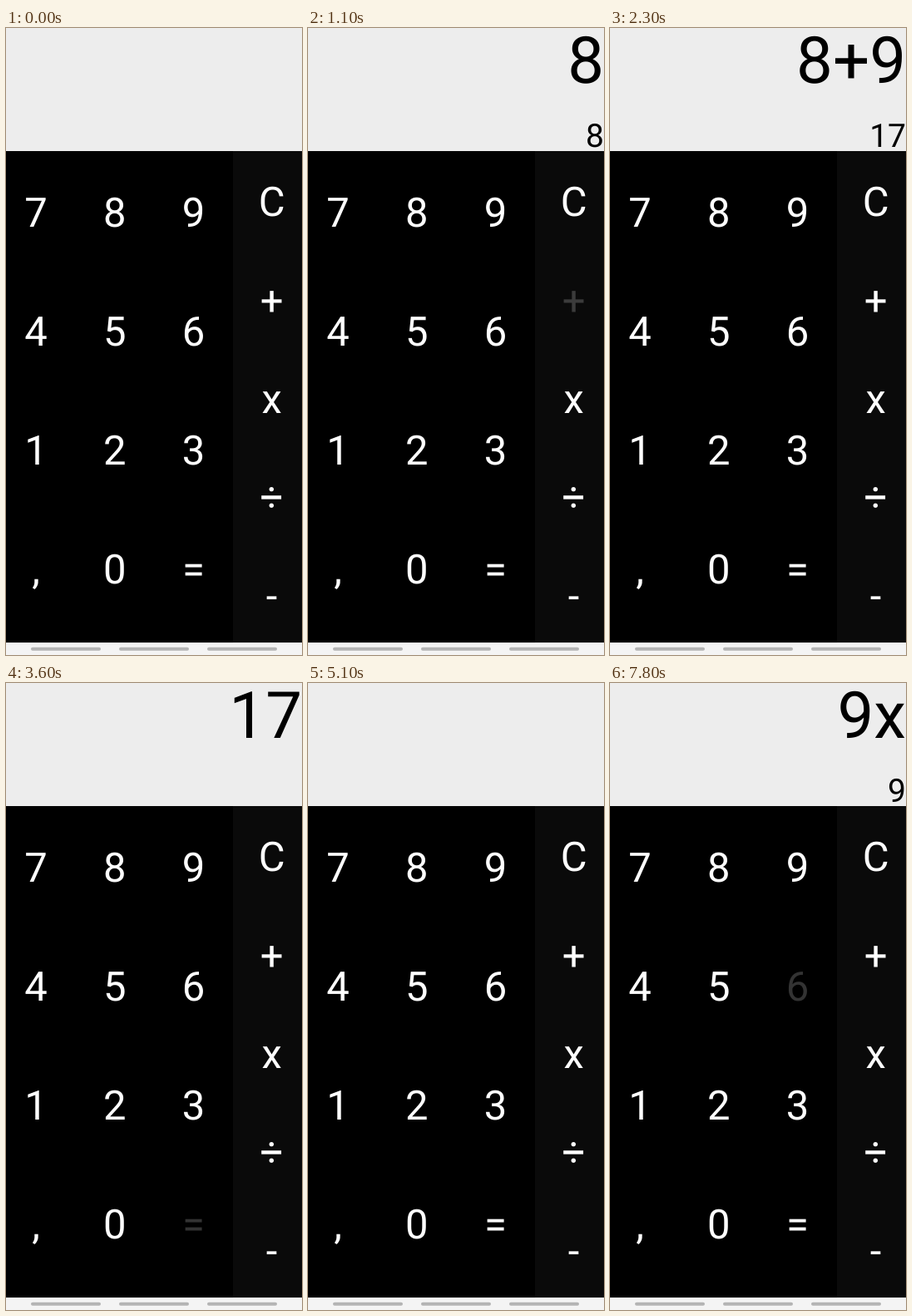
These frames come from a looping animation (356x754 px, 8 s). An HTML page:

```html
<!DOCTYPE html>
<html lang="en">
<head>
<meta charset="utf-8">
<title>Calculator</title>
<style>
  html, body { margin: 0; width: 100%; height: 100%; overflow: hidden; background: #ededed; }
  svg { display: block; width: 356px; height: 754px; }
  text { font-family: Roboto, Arial, sans-serif; text-rendering: geometricPrecision; }
  .key { font-size: 49px; fill: #fff; text-anchor: middle; }
  .out { text-anchor: end; fill: #000; }
</style>
</head>
<body>
<svg id="stage" viewBox="0 0 356 754">
  <rect width="356" height="148" fill="#ededed"/>
  <rect y="148" width="356" height="591" fill="#000"/>
  <rect x="273" y="148" width="83" height="591" fill="#0a0a0a"/>
  <rect y="739" width="356" height="15" fill="#f4f4f4"/>
  <g id="nav" fill="#b4b4b4"></g>
  <text id="entry" class="out" x="356" y="66" font-size="78"></text>
  <text id="result" class="out" x="356" y="143.4" font-size="39"></text>
</svg>
<script>
const LOOP = 8000, TICK = 100, FADE = 200, DIM = 0.2;
const stage = document.getElementById('stage');
const entry = document.getElementById('entry');
const result = document.getElementById('result');

function add(parent, tag, attrs, content = '') {
  const el = document.createElementNS('http://www.w3.org/2000/svg', tag);
  for (const name in attrs) el.setAttribute(name, attrs[name]);
  el.textContent = content;
  return parent.appendChild(el);
}

for (let i = 0; i < 3; i++) {
  add(document.getElementById('nav'), 'rect',
    { x: 30 + 106 * i, y: 744.8, width: 84, height: 4, rx: 2 });
}

const keys = {};
const addKey = (label, x, y) => {
  keys[label] = add(stage, 'text', { class: 'key', x, y }, label);
};
['789', '456', '123', ',0='].forEach((row, r) =>
  [...row].forEach((label, c) => addKey(label, 36 + 94.7 * c, 239 + 143 * r)));
[...'C+x÷-'].forEach((label, i) => addKey(label, 319.6, 226.4 + 118.3 * i));

// Each press: key, touch time, release time
const presses = [
  ['8', 100, 430], ['+', 1100, 1330], ['9', 1700, 2030], ['=', 3200, 3630],
  ['C', 4200, 4830], ['9', 5800, 6200], ['x', 6900, 7000], ['6', 7800, LOOP]
];

// Each reading: start time, entry line, result line
const readings = [
  [0, '', ''], [400, '8', '8'], [1200, '8+', '8'], [2000, '8+9', '17'],
  [3600, '17', ''], [4700, '', ''], [6100, '9', '9'], [6900, '9x', '9']
];

const easeInOut = p => p < 0.5 ? 2 * p * p : 1 - 2 * (1 - p) ** 2;

function keyOpacity(t, release) {
  const p = Math.min(1, Math.max(0, (t - release) / FADE));
  return DIM + (1 - DIM) * easeInOut(p);
}

function draw(time) {
  const t = Math.floor((time % LOOP) / TICK) * TICK;
  for (const label in keys) {
    const press = presses.findLast(([key, down]) => key === label && down <= t);
    keys[label].setAttribute('fill-opacity', press ? keyOpacity(t, press[2]) : 1);
  }
  const reading = readings.findLast(([start]) => start <= t);
  entry.textContent = reading[1];
  result.textContent = reading[2];
}

const start = performance.now();
function frame() {
  draw(performance.now() - start);
  requestAnimationFrame(frame);
}
frame();
</script>
</body>
</html>
```
